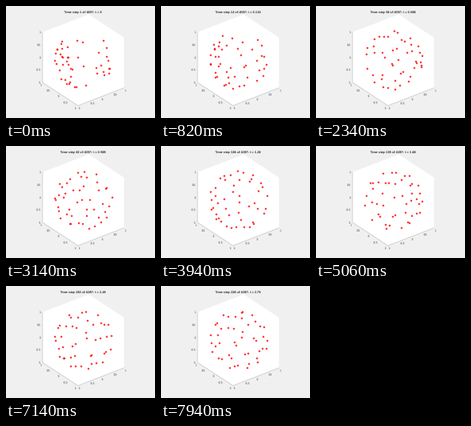
These frames come from a looping animation (187 px wide and 140 px high, 8000 ms). A matplotlib script:

```python
import numpy as np
import matplotlib.pyplot as plt
from matplotlib.animation import FuncAnimation

W, H, DPI = 187, 140, 100
CX, CY, R = 97, 67.5, 36.4           # sphere centre and radius in pixels
CHARGES, SEED = 46, 7
STEPS, T_END, DAMPING = 4097, 50, 1.0
DT = T_END / (STEPS - 1)
TICK_MS, LOOP_MS = 20, 8000
INK = "#505050"

plt.rcParams["font.family"] = "Liberation Sans"
plt.rcParams["text.hinting"] = "none"


def unit(v):
    return v / np.linalg.norm(v, axis=1, keepdims=True)


def simulate(pos, count):
    """Damped Coulomb repulsion of unit charges held on the sphere."""
    vel = np.zeros_like(pos)
    path = [pos]
    for _ in range(count):
        gap = pos[:, None] - pos[None]
        dist = np.sqrt((gap ** 2).sum(2) + 0.005)
        force = (gap / dist[..., None] ** 3).sum(1)
        vel = vel + DT * (force - DAMPING * vel)
        vel -= (vel * pos).sum(1, keepdims=True) * pos
        pos = unit(pos + DT * vel)
        path.append(pos)
    return np.array(path)


def project(x, y, z):
    """Orthographic view, azimuth -37.5 and elevation 30 degrees."""
    az, el = np.radians([37.5, 30])
    right = x * np.cos(az) - y * np.sin(az)
    away = x * np.sin(az) + y * np.cos(az)
    up = z * np.cos(el) + away * np.sin(el)
    return CX + R * right, CY - R * up


def step_at(ms):
    """Number of simulation steps done at a given time."""
    if ms < 500:
        return 0
    shown = (ms - 500) // 80 + 1
    return int(2.395 * shown)


rng = np.random.default_rng(SEED)
path = simulate(unit(rng.normal(size=(CHARGES, 3))), step_at(LOOP_MS))

fig = plt.figure(figsize=(W / DPI, H / DPI), dpi=DPI, facecolor="#f0f0f0")
ax = fig.add_axes([0, 0, 1, 1])
ax.set_xlim(0, W)
ax.set_ylim(H, 0)
ax.axis("off")

outline = [(-1, 1, 1), (1, 1, 1), (1, -1, 1), (1, -1, -1),
           (-1, -1, -1), (-1, 1, -1)]
ax.fill(*np.transpose([project(*c) for c in outline]), color="white", lw=0)

edges = [(-1, 1, 1), (-1, 1, -1), (-1, -1, -1), (1, -1, -1)]
ax.plot(*np.transpose([project(*c) for c in edges]), color=INK, lw=0.25,
        alpha=0.6)


def label(value, corner, dx, dy, side):
    x, y = project(*corner)
    ax.text(x + dx, y + dy, f"{value:g}", size=2.6, color=INK,
            ha=side, va="center_baseline")


for v in np.linspace(-1, 1, 5):
    label(v, (-1, 1, v), -1.8, 0, "right")
    label(v, (-1, v, -1), -1, 2.8, "right")
    label(v, (v, -1, -1), 1, 2.8, "left")

title = ax.text(CX, 9.4, "", size=2.9, weight="bold", color="#303030",
                ha="center", va="baseline")
dots, = ax.plot([], [], "o", color="red", ms=1.6, mew=0)


def draw(frame):
    n = step_at(frame * TICK_MS)
    dots.set_data(*project(*path[n].T))
    title.set_text(f"Time step {n + 1} of {STEPS}: t = {n * DT:.3g}")
    return dots, title


anim = FuncAnimation(fig, draw, frames=LOOP_MS // TICK_MS, interval=TICK_MS,
                     repeat=True, repeat_delay=0)
plt.show()
```
